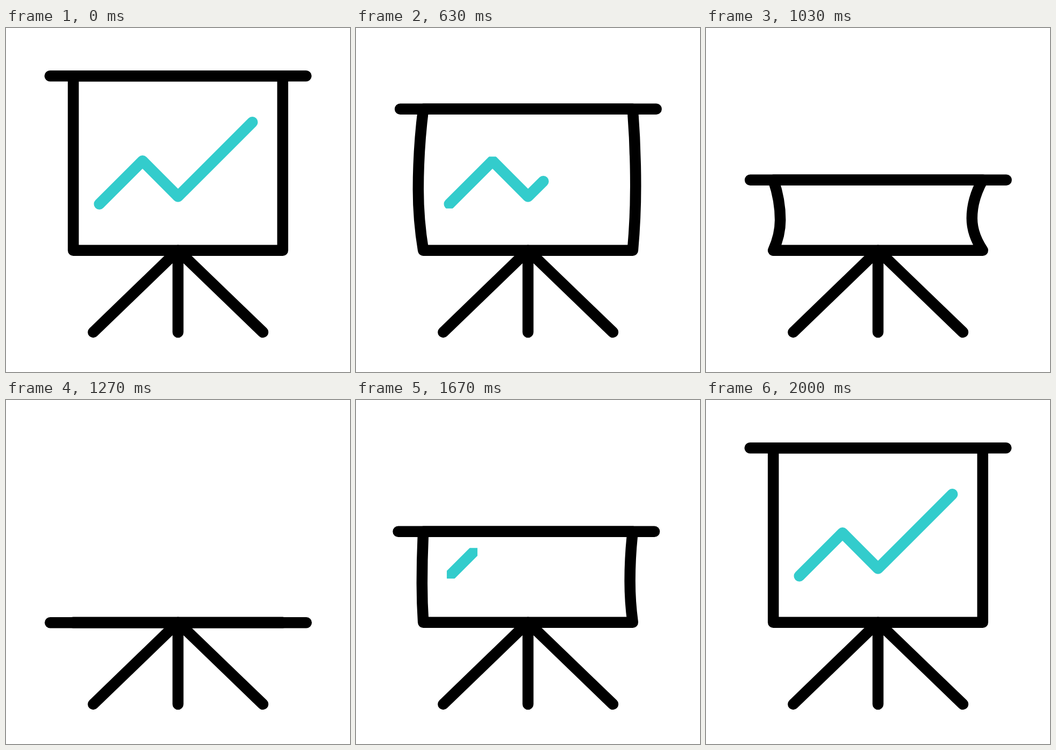
Animation of 640 by 640 pixels, one loop 2500 ms. Source, as an HTML page:

```html
<!DOCTYPE html>
<html lang="en">
<head>
<meta charset="utf-8">
<title>Presentation board</title>
<style>
  html, body { margin: 0; height: 100%; overflow: hidden; background: #fff; }
  svg { display: block; width: 100%; height: 100%; }
  path { fill: none; stroke: #000; stroke-width: 20.5; stroke-linecap: round; stroke-linejoin: round; }
  #chart { stroke: #33cccc; }
</style>
</head>
<body>
<svg viewBox="0 0 640 640">
  <clipPath id="window"><rect id="clip"/></clipPath>
  <path d="M162.3 566 320 413.7 478 566M320 413.7V566"/>
  <path id="sheet"/>
  <path id="bar" d="M81.8 89.3H558.3"/>
  <g clip-path="url(#window)"><path id="chart"/></g>
</svg>
<script>
const LOOP = 2500, STEP = 1000 / 30;
const TOP = 89.3, BOTTOM = 413.7, LEFT = 125.2, RIGHT = 514.8;

// time, drop of the bar, sideways shift, bulge of the left and right edge
const POSES = [
  [445, 0, 0, 0, 0],
  [820, 122, 0.7, -18.6, 10.8],
  [1000, 188, 0.4, 13.5, -20.8],
  [1280, 325.8, 0.4, 0, 0],
  [1550, 188, 0, 13.5, -20.8],
  [1785, 122, -6.5, -18.6, 10.8],
  [2000, 0, 0, 0, 0]
];
const CHART = [[173.7, 327.6], [254, 247.3], [320, 313.6], [458.3, 175.3]];

const $ = id => document.getElementById(id);
const ease = (t, a, b) => {
  const u = Math.min(1, Math.max(0, (t - a) / (b - a)));
  return u * u * (3 - 2 * u);
};
const mix = (a, b, s) => a + (b - a) * s;

function poseAt(t) {
  const i = Math.max(1, POSES.findIndex(p => p[0] > t));
  if (t >= 2000) return POSES[0].slice(1);
  const a = POSES[i - 1], b = POSES[i], s = ease(t, a[0], b[0]);
  return a.map((v, k) => mix(v, b[k], s)).slice(1);
}

// One edge of the sheet, from y0 to y1, bowed by `bulge` at height `mid`
function edge(x, bulge, y0, y1, mid) {
  const xm = x + bulge;
  return `Q${xm} ${(y0 + mid) / 2} ${xm} ${mid}Q${xm} ${(mid + y1) / 2} ${x} ${y1}`;
}

function drawBoard(t) {
  const [drop, shift, left, right] = poseAt(t);
  const y = TOP + drop;
  $('bar').setAttribute('transform', `translate(${shift} ${drop})`);
  $('sheet').setAttribute('d',
    `M${LEFT} ${y}` + edge(LEFT, left, y, BOTTOM, mix(y, BOTTOM, 0.57)) +
    `H${RIGHT}` + edge(RIGHT, right, BOTTOM, y, mix(y, BOTTOM, 0.545)) + 'Z');
}

// Keep the first part of the line, clipped to its box plus a tenth on each side
function drawChart(part) {
  const sizes = CHART.slice(1).map((p, i) => Math.hypot(p[0] - CHART[i][0], p[1] - CHART[i][1]));
  let rest = part * sizes.reduce((a, b) => a + b);
  const points = [CHART[0]];
  for (let i = 0; i < sizes.length && rest > 0; i++) {
    const s = Math.min(1, rest / sizes[i]);
    points.push(CHART[i].map((v, k) => mix(v, CHART[i + 1][k], s)));
    rest -= sizes[i];
  }
  $('chart').setAttribute('d', part > 0 ? 'M' + points.join('L') : '');
  [['x', 'width'], ['y', 'height']].forEach(([pos, len], k) => {
    const vals = points.map(p => p[k]);
    const min = Math.min(...vals), size = Math.max(...vals) - min;
    $('clip').setAttribute(pos, min - size * 0.1);
    $('clip').setAttribute(len, size * 1.2);
  });
}

function draw(now) {
  const t = Math.floor((now % LOOP + 4) / STEP) * STEP;
  drawBoard(t);
  drawChart(t < 1200 ? 1 - ease(t, 445, 890) : ease(t, 1550, 2000));
}

const start = performance.now();
function tick() {
  draw(performance.now() - start);
  requestAnimationFrame(tick);
}
tick();
</script>
</body>
</html>
```
